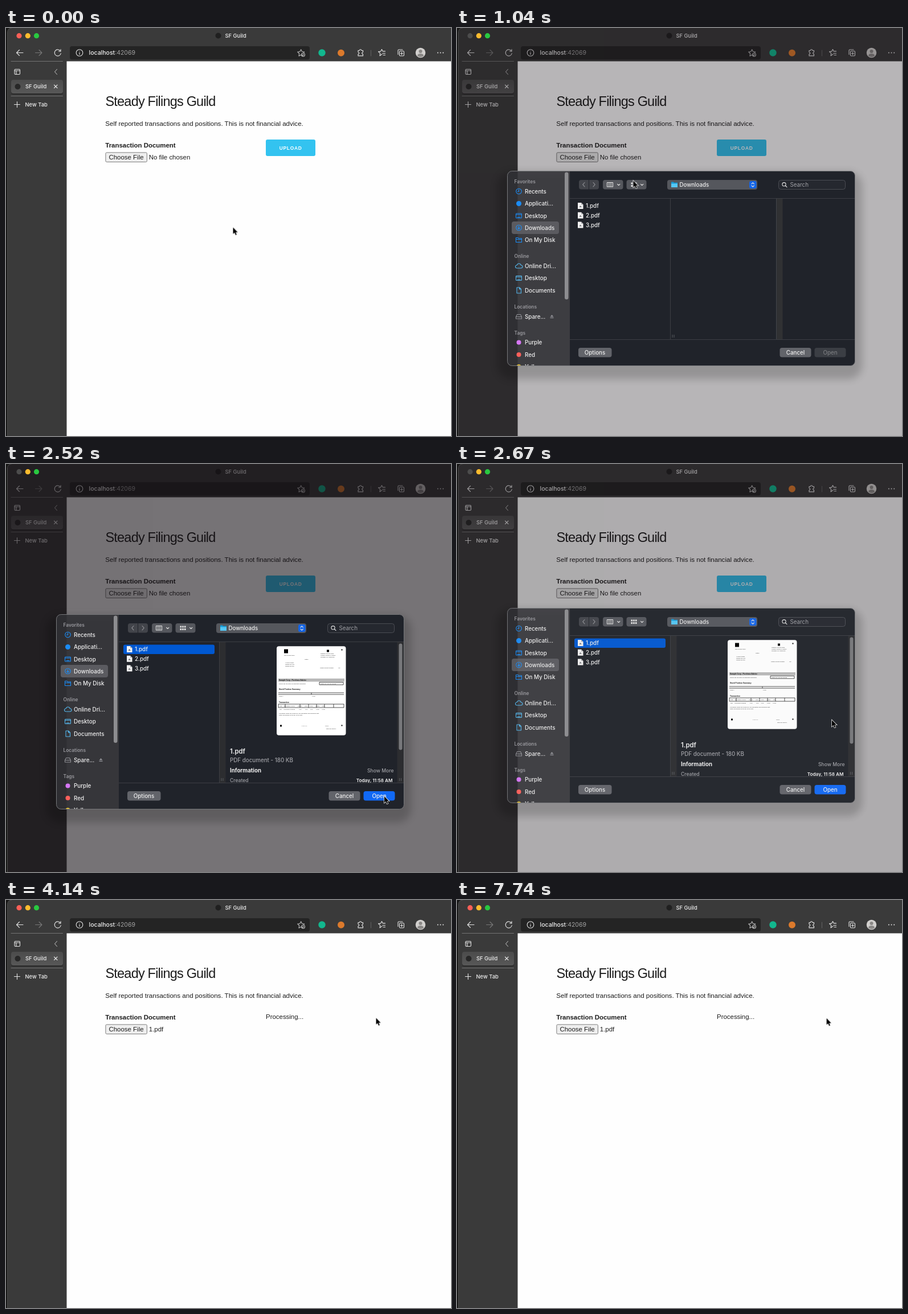
An HTML page that plays this animation: 781x717 px, repeating every 8000 ms.

```html
<!DOCTYPE html>
<html lang="en">
<head>
<meta charset="utf-8">
<title>Steady Filings Guild</title>
<style>
html, body { margin: 0; width: 100%; height: 100%; overflow: hidden; background: #161616; }
svg { display: block; width: 781px; height: 717px; }
text { font: 500 9.8px Inter, sans-serif; fill: #f0f0f0; white-space: pre; }
.page text { font: 11.45px "Liberation Sans", Arial, sans-serif; fill: #1c1c1c; }
.page .title { font-size: 23.5px; letter-spacing: -.8px; }
.page .lead { font-size: 11.57px; }
.page .label { font-weight: bold; }
.page .caps { font-size: 8.4px; font-weight: bold; letter-spacing: .76px; fill: #fff; }
.icon { fill: none; stroke: #e4e4e4; stroke-width: 1.1; stroke-linecap: round; stroke-linejoin: round; }
.blue { stroke: #1b8cf5; }
.cyan { stroke: #55b8ee; }
.grey { stroke: #8f9095; }
text.head { font-size: 8.4px; font-weight: 600; fill: #98989d; }
text.soft { fill: #a0a1a6; }
text.mid { text-anchor: middle; }
text.big { font-size: 11.3px; font-weight: 600; }
text.bold { font-size: 9.7px; font-weight: 700; }
text.small { font-size: 8.6px; }
text.date { font-size: 8.2px; font-weight: 600; text-anchor: end; }
.paper text { font: 2.3px "Liberation Sans", Arial, sans-serif; fill: #111; }
.paper .strong { font-size: 3.2px; font-weight: bold; }

.red, .dim, .sheet, .picked, .unpicked, .upload, .hover, .busy, .empty, .chosen, .cursor {
  animation: 8s step-end infinite;
}
.red { animation-name: red; }
.dim { animation-name: dim; }
.sheet { animation-name: sheet; }
.picked { animation-name: picked; }
.unpicked { animation-name: unpicked; }
.upload { animation-name: upload; }
.hover { animation-name: hover; }
.busy { animation-name: busy; }
.empty { animation-name: empty; }
.chosen { animation-name: chosen; }
.cursor { animation-name: cursor; }

@keyframes red { 0% { fill: #fb5f57 } 9.2% { fill: #4c4c4c } 36.95% { fill: #fb5f57 } }
@keyframes dim {
  0% { opacity: 0 } 11.1% { opacity: .03 } 12.95% { opacity: .3 } 14.7% { opacity: .55 }
  16.6% { opacity: .58 } 33.35% { opacity: .34 } 35.2% { opacity: .045 } 36.95% { opacity: 0 }
}
@keyframes sheet {
  0% { opacity: 0; transform: translateY(-27px) }
  11.1% { opacity: .08; transform: translateY(-25.5px) }
  12.95% { opacity: 1; transform: translateY(-13px) }
  14.7% { opacity: 1; transform: translateY(-1px) }
  16.6% { opacity: 1; transform: none }
  33.35% { opacity: .95; transform: translateY(-11px) }
  35.2% { opacity: .08; transform: translateY(-24.5px) }
  36.95% { opacity: 0; transform: translateY(-27px) }
}
@keyframes picked { 0% { opacity: 0 } 20.35% { opacity: 1 } }
@keyframes unpicked { 0% { opacity: 1 } 20.35% { opacity: 0 } }
@keyframes upload { 0% { opacity: 1 } 44.35% { opacity: 0 } }
@keyframes hover { 0% { fill: #33c3f0 } 38.85% { fill: #1eaedb } }
@keyframes busy { 0% { opacity: 0 } 44.35% { opacity: 1 } }
@keyframes empty { 0% { opacity: 1 } 36.95% { opacity: 0 } }
@keyframes chosen { 0% { opacity: 0 } 36.95% { opacity: 1 } }
@keyframes cursor {
  0% { transform: translate(398.5px, 350.5px) }
  1.85% { transform: translate(290px, 280px) }
  3.7% { transform: translate(228px, 229px) }
  7.35% { transform: translate(229px, 229px) }
  9.2% { transform: translate(245px, 236px) }
  11.1% { transform: translate(290px, 256px) }
  12.95% { transform: translate(309.5px, 268.5px) }
  14.7% { transform: translate(290px, 290px) }
  16.6% { transform: translate(257px, 315px) }
  18.45% { transform: translate(247px, 324px) }
  20.35% { transform: translate(246px, 325px) }
  22.2% { transform: translate(258px, 333px) }
  24.1% { transform: translate(320px, 374px) }
  25.95% { transform: translate(440px, 455px) }
  27.7% { transform: translate(570px, 540px) }
  29.6% { transform: translate(650px, 580px) }
  31.45% { transform: translate(664px, 584px) }
  33.35% { transform: translate(658px, 450px) }
  35.2% { transform: translate(624.5px, 230.5px) }
  36.95% { transform: translate(566px, 217px) }
  38.85% { transform: translate(524px, 212px) }
  40.7% { transform: translate(512px, 211px) }
  42.45% { transform: translate(511px, 211px) }
  44.35% { transform: translate(530px, 211px) }
  46.2% { transform: translate(590px, 209px) }
  48.1% { transform: translate(638px, 207px) }
  49.85% { transform: translate(651px, 207px) }
  51.7% { transform: translate(649.5px, 207.3px) }
  79.85% { transform: translate(649.3px, 208px) }
  85.45% { transform: translate(648.8px, 207.5px) }
  91.1% { transform: translate(648.3px, 207.3px) }
  96.7% { transform: translate(648.6px, 207.8px) }
}
</style>
</head>
<body>
<svg viewBox="0 0 781 717">
  <defs>
    <linearGradient id="tab" x2="0" y2="1"><stop stop-color="#4c4c4c"/><stop offset="1" stop-color="#585858"/></linearGradient>
    <filter id="blur" x="-20%" y="-20%" width="140%" height="150%"><feGaussianBlur stdDeviation="7"/></filter>
    <clipPath id="frame"><rect x="88.500" y="264.500" width="610" height="342" rx="8"/></clipPath>
    <clipPath id="preview"><rect x="375" y="313" width="323" height="246.500"/></clipPath>
    <g id="file">
      <path d="M0 0h6l3.500 3.500v7.500h-9.500z" fill="#f2f2f2"/>
      <path d="M6 0v3.500h3.500z" fill="#a9a9ad"/>
      <path d="M2.500 8l2-3 2.500 3z" fill="#74767c"/>
    </g>
    <path id="down" class="icon" d="M0 0l2.200 2.200 2.200-2.200"/>
    <path id="folder" class="icon blue" d="M.5 1.500h3.500l1 1.300h5.500v6.700h-10zM.5 4.500h10"/>
    <g id="screen"><rect x=".5" y=".5" width="10" height="8" rx="1"/><path d="M.5 2.500h10M3 7h5"/></g>
  </defs>

  <!-- Browser window -->
  <path d="M3 717V8q0-8 8-8h770v717z" fill="#3a3a3a"/>
  <path d="M2.500 717V8q0-8 8-8" fill="none" stroke="#5c5c5c" stroke-width=".8"/>
  <rect x="112" y="32" width="421" height="23.500" rx="4" fill="#242424"/>
  <circle cx="372.500" cy="13.500" r="5" fill="#202020"/>
  <text x="384.500" y="17" style="font-size:9.400px">SF Guild</text>
  <g class="icon">
    <path d="M30 43.500H18.500m5-5l-5 5 5 5"/>
    <path d="M51.500 43.500H63m-5-5l5 5-5 5" stroke="#777"/>
    <path d="M95.500 40.500a5.600 5.600 0 1 0 .8 4M96 37.500v3.500h-3.500"/>
    <circle cx="129" cy="43.500" r="5.800"/><path d="M129 43v3.500M129 40.700v.1"/>
    <path d="M521 49l-3.300-1.800-3.700 2 .7-4.200-3-2.900 4.100-.6 1.900-3.700 1.900 3.700 4.100.6-1.300 1.300" stroke="#bbb"/>
    <circle cx="521.500" cy="47" r="3" stroke="#bbb"/><path d="M520.300 47h2.400m-1.200-1.200v2.400" stroke="#bbb" stroke-width=".8"/>
    <path d="M618 39.500h2.400a1.700 1.700 0 0 1 3.400 0h2.700v3a1.700 1.700 0 0 0 0 3.400v3h-8.500v-3a1.700 1.700 0 0 0 0-3.400z"/>
    <path d="M640.500 39v10" stroke="#606060"/>
    <path d="M660 46l-4 2.800.8-4.200-3.300-3 4.200-.5 1.800-3.600 1.800 3.400h4.200M661 44.500h4.500M662 47.500h3.500"/>
    <rect x="690.500" y="40.500" width="8" height="8.500" rx="1.500"/><path d="M688 46.500v-7q0-1.500 1.500-1.500h6.500M694.500 42.500v4.500M692.300 44.700h4.400"/>
    <path d="M757.800 43.500h.1M762.500 43.500h.1M767.200 43.500h.1" stroke-width="1.900"/>
    <rect x="15" y="72.500" width="9.500" height="9" rx="1.500"/><path d="M15 75h9.500M18 75v6.500"/>
    <path d="M89.500 72.500l-4 4.500 4 4.500" stroke="#aaa"/>
    <path d="M9 58.500h90.500M9 119.500h90.500" stroke="#747474" stroke-width="1"/>
    <path d="M14.500 134.500h10m-5-5v10"/>
  </g>
  <circle cx="554.500" cy="43.500" r="6.200" fill="#12b78e"/>
  <circle cx="588" cy="43.800" r="6" fill="#dc7a2c"/>
  <circle cx="727.500" cy="43.500" r="8.700" fill="#d2d0ce"/>
  <circle cx="727.500" cy="41" r="3" fill="#8a8886"/><path d="M722 49q0-4 5.500-4t5.500 4q-5 4-11 0" fill="#8a8886"/>
  <text x="145.500" y="47.200" style="font-size:10.500px">localhost<tspan fill="#a2a2a2" font-weight="400">:42069</tspan></text>
  <rect x="9" y="92" width="91" height="24.500" rx="4" fill="#282828"/>
  <rect x="9" y="91" width="91" height="24" rx="4" fill="url(#tab)"/>
  <circle cx="20.500" cy="103" r="5" fill="#272727"/>
  <text x="34" y="106.300" style="font-size:9.400px">SF Guild</text>
  <path class="icon" d="M84.500 100l5.500 5.500m0-5.500l-5.500 5.500"/>
  <text x="33.500" y="138" style="font-size:9.400px">New Tab</text>

  <!-- Page -->
  <g class="page">
    <path d="M106.500 58.500H781V717H106.500z" fill="#fefefe"/>
    <text class="title" x="174.500" y="136.500">Steady Filings Guild</text>
    <text class="lead" x="174.300" y="171.800">Self reported transactions and positions. This is not financial advice.</text>
    <text class="label" x="174.300" y="210">Transaction Document</text>
    <rect x="174.900" y="218.900" width="72.500" height="16.500" rx="1.800" fill="#efefef" stroke="#6f6f6f" stroke-width=".9"/>
    <text x="180.500" y="231.200">Choose File</text>
    <text class="empty" x="250.800" y="231.200">No file chosen</text>
    <text class="chosen" x="250.800" y="231.200">1.pdf</text>
    <g class="upload">
      <rect class="hover" x="456" y="196" width="87" height="29" rx="3"/>
      <text class="caps" x="479.700" y="214.400">UPLOAD</text>
    </g>
    <text class="busy" x="456" y="209.300">Processing...</text>
  </g>

  <path class="dim" d="M3 717V8q0-8 8-8h770v717z" fill="#120d12"/>
  <circle class="red" cx="23" cy="13.700" r="4.600"/>
  <circle cx="38.300" cy="13.700" r="4.600" fill="#fdbb2e"/>
  <circle cx="53.500" cy="13.700" r="4.600" fill="#29c840"/>

  <!-- File dialog -->
  <g class="sheet">
    <rect x="71" y="266" width="640" height="364" rx="24" opacity=".19" filter="url(#blur)"/>
    <g clip-path="url(#frame)">
      <path d="M88 264h110v343H88z" fill="#323236" opacity=".88"/>
      <path d="M198 264h501v343H198z" fill="#20232a"/>
      <rect x="96" y="353" width="83" height="22" rx="4" fill="#5b5b60"/>
      <rect x="189" y="266.500" width="6.500" height="223.500" rx="3.200" fill="#8d8d90"/>

      <text class="head" x="100.500" y="286">Favorites</text>
      <text x="119" y="303.600">Recents</text>
      <text x="119" y="325">Applicati...</text>
      <text x="119" y="346.500">Desktop</text>
      <text x="119" y="367.700">Downloads</text>
      <text x="119" y="389">On My Disk</text>
      <text class="head" x="100.500" y="417">Online</text>
      <text x="119" y="435">Online Dri...</text>
      <text x="119" y="456.400">Desktop</text>
      <text x="119" y="477.700">Documents</text>
      <text class="head" x="100.500" y="506">Locations</text>
      <text x="119" y="523.600">Spare...</text>
      <text class="head" x="100.500" y="551.500">Tags</text>
      <text x="119" y="569">Purple</text>
      <text x="119" y="590.500">Red</text>
      <text x="119" y="611.500">Yellow</text>
      <circle cx="108.500" cy="565.500" r="4" fill="#d677f5"/>
      <circle cx="108.500" cy="587" r="4" fill="#fc605b"/>
      <circle cx="108.500" cy="608.300" r="4" fill="#fcd32e"/>
      <circle cx="108.500" cy="321.500" r="4.500" fill="#1b8cf5"/>
      <g class="icon blue">
        <circle cx="108.500" cy="300" r="4.800"/><path d="M108.500 297v3.300h-2.500"/>
        <circle cx="108.500" cy="364" r="4.800"/><path d="M108.500 361.300v5m-2-2l2 2 2-2"/>
        <use href="#screen" x="103" y="338.500"/>
      </g>
      <use href="#folder" x="103" y="380"/>
      <g class="icon cyan">
        <path d="M105.500 435q-3 0-3-2.500t2.700-2.700q.7-2.800 3.500-2.800t3.500 2.800q2.800.2 2.800 2.700t-3 2.500z"/>
        <use href="#screen" x="103" y="448"/>
        <path d="M105 469h4.500l3 3v7H105zM109.500 469v3h3"/>
      </g>
      <path class="icon grey" d="M105.500 516.500h6l2 4v3.500h-10v-3.500zM103.500 520.500h10"/>
      <path d="M163.500 520.500l3-3.500 3 3.500zM163.500 521.700h6v1.200h-6z" fill="#8f9095"/>

      <g fill="#55575d">
        <path d="M218 280h13v16.500h-13q-4 0-4-4v-8.500q0-4 4-4M232 280h13q4 0 4 4v8.500q0 4-4 4h-13z" fill="#42444a"/>
        <rect x="256" y="280" width="35.500" height="16.500" rx="4"/>
        <rect x="297.500" y="280" width="35" height="16.500" rx="4"/>
        <rect x="369" y="280" width="158" height="17" rx="4"/>
        <rect x="213" y="575" width="58.500" height="16.500" rx="4" fill="#62646a"/>
        <rect x="566.500" y="575" width="55" height="16.500" rx="4" fill="#62646a"/>
      </g>
      <path class="icon grey" d="M224 284.500l-3.200 3.700 3.200 3.700M239 284.500l3.200 3.700-3.200 3.700"/>
      <path class="icon" d="M263.500 284.500h10v7.500h-10zM266.800 284.500v7.500M270.200 284.500v7.500"/>
      <path d="M305.500 286h10m-10 4.500h10" stroke="#e4e4e4" stroke-width="2.800" stroke-dasharray="2.600 1.100"/>
      <use href="#down" x="281.500" y="287.300"/><use href="#down" x="322.500" y="287.300"/>
      <path d="M376 283.500h4l1 1.200h6v8.300h-11z" fill="#159bd8"/><path d="M376 286.500h11v6.500h-11z" fill="#55c7f4"/>
      <text x="390.500" y="291.700" style="font-size:9.700px">Downloads</text>
      <rect x="513" y="282" width="12.500" height="13" rx="3" fill="#1365e8"/>
      <path class="icon" d="M517 287l2.200-2.200 2.200 2.200M517 290l2.200 2.200 2.200-2.200"/>
      <rect x="564.500" y="280.500" width="117" height="16" rx="4" fill="#25282f" stroke="#55575d" stroke-width=".8"/>
      <circle class="icon" cx="574" cy="287.700" r="3.100"/><path class="icon" d="M576.300 290l2.700 2.700"/>
      <text class="soft" x="584.500" y="292" style="font-weight:400">Search</text>
      <path d="M198 312.500h501M198 560.500h501M374.500 313v247" stroke="#3c3e44" fill="none"/>
      <path d="M378 552v5m3-5v5" stroke="#66686e" stroke-width=".8"/>

      <rect class="picked" x="206" y="317.500" width="160" height="16.500" rx="3" fill="#0058d1"/>
      <use href="#file" x="212" y="320"/><text x="226" y="329">1.pdf</text>
      <use href="#file" x="212" y="336.700"/><text x="226" y="345.800">2.pdf</text>
      <use href="#file" x="212" y="353.400"/><text x="226" y="362.600">3.pdf</text>

      <g class="unpicked">
        <path d="M561 313h10.500v247H561z" fill="#303133"/><path d="M560.500 313v247" stroke="#42444a"/>
      </g>
      <g class="picked" clip-path="url(#preview)">
        <path d="M375 313h10.500v247H375zM686.500 313H698v247h-11.500z" fill="#2c2d30"/>
        <path d="M378 552v5m3-5v5M690.500 552v5m3-5v5" stroke="#66686e" stroke-width=".8"/>
        <rect x="689.500" y="315.500" width="6" height="187" rx="3" fill="#77787b"/>
        <g class="paper">
          <rect x="475" y="320.300" width="121.500" height="156.500" rx="4" fill="#fff"/>
          <path d="M488 325.500h7v7h-7zM563 326.500h4v4h-4zM588.500 325.500h2v2h-2zM481 458.500h3v3h-3zM588.500 458.500h2v2h-2z"/>
          <text x="488" y="337">Plan account form</text>
          <text x="524" y="344">Notice</text>
          <text x="490" y="350">Account holder</text><text x="490" y="353">Mailing line one</text><text x="490" y="356">Mailing line two</text>
          <text x="552" y="334">Registrar service office</text><text x="552" y="337">Contact centre for holders</text><text x="552" y="340">Weekdays by telephone</text>
          <text x="551" y="359">Holder account number</text><text x="583" y="359">INT</text>
          <path d="M478 377h116v5.500H478z" fill="#b9b9b9"/>
          <text class="strong" x="479" y="381">Sample Corp - Purchase Advice</text>
          <path d="M550 383.500h42v4.500h-42zM478 402h115M478 405h115M478 422h115v6H478zM490 422v6M516 422v6M531 422v6M545 422v6M559 422v6M575 422v6M536 402v3" fill="none" stroke="#222" stroke-width=".8"/>
          <text x="552" y="386.700">Retain for your tax records</text>
          <text x="479" y="387">Please see the notes for important information</text>
          <text class="strong" x="479" y="397">Stock Position Summary</text>
          <text x="479" y="409">Class A</text><text x="537" y="409">0.000</text>
          <text class="strong" x="479" y="420">Transaction</text>
          <text x="480" y="426">Date    Description of entry       Amount       Fees       Price       Shares      Total</text>
          <text x="480" y="432">Day     Purchase of shares           0.00          0.00       0.00         0.000       0.000</text>
          <text x="479" y="439">The figures above are shown for your information and should be kept.</text>
          <text x="479" y="442">Rates are applied on the day of the entry.</text>
          <text x="519" y="461">1 U A L T</text><text x="560" y="461">U D N</text><text x="562" y="466">form 000 sheet 1</text>
        </g>
        <text class="big" x="393" y="508.700">1.pdf</text>
        <text class="soft" x="393" y="524">PDF document - 180 KB</text>
        <text class="bold" x="393" y="542.300">Information</text>
        <text class="soft small" x="634" y="542">Show More</text>
        <text class="soft small" x="393" y="559">Created</text>
        <text class="date" x="678.500" y="559">Today, 11:58 AM</text>
      </g>

      <text class="mid" x="242" y="586.800">Options</text>
      <text class="mid" x="594" y="586.800">Cancel</text>
      <rect class="unpicked" x="627.500" y="575" width="55" height="16.500" rx="4" fill="#3b3e44"/>
      <rect class="picked" x="627.500" y="575" width="55" height="16.500" rx="4" fill="#1169f5"/>
      <text class="mid unpicked" x="655" y="586.800" fill-opacity=".35">Open</text>
      <text class="mid picked" x="655" y="586.800">Open</text>
    </g>
    <rect x="88.500" y="264.500" width="610" height="342" rx="8" fill="none" stroke="#77787b"/>
  </g>

  <path class="cursor" d="M0 0V11.500l2.600-2.400 1.900 4.300 1.900-.8-1.900-4.200h3.700z" stroke="#fff" stroke-width="1.400" paint-order="stroke"/>
</svg>
</body>
</html>
```
